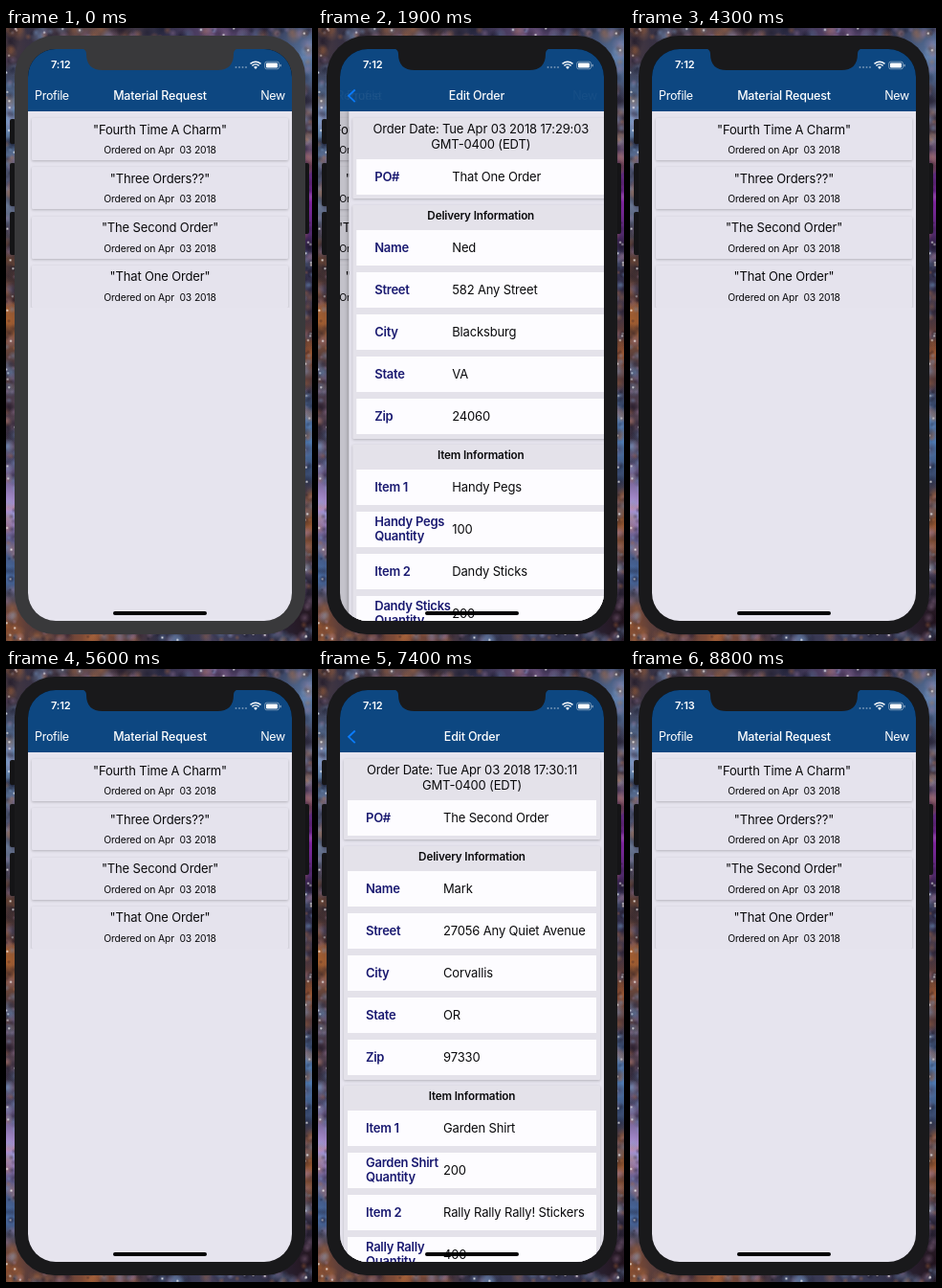
An HTML page with a canvas for the animation above (8.9 s loop, 320x640 px).

```html
<!DOCTYPE html>
<html lang="en">
<head>
<meta charset="utf-8">
<title>Material Request</title>
<style>
html, body { margin: 0; width: 100%; height: 100%; overflow: hidden; background: #1d2038; }
#stage {
  --bezel: #19191b;
  position: relative; width: 320px; height: 640px; overflow: hidden;
  font: 13px/15.6px Inter, "Open Sans", sans-serif; letter-spacing: -.012em; color: #0a0a0c;
}
#stage.idle { --bezel: #39393b; }
#stage * { position: absolute; box-sizing: border-box; }
#stage br { position: static; }
#sky { left: 0; top: 0; }
.key { background: #141416; border-radius: 2px; width: 6px; }
#body { left: 9px; top: 8px; width: 304px; height: 625px; border-radius: 42px; background: var(--bezel); }
#screen { inset: 0; clip-path: inset(22px 21px 21px 23px round 29px); background: #000; }
.page { left: 23px; top: 86px; width: 276px; height: 533px; background: #e6e4ee; }
#form { box-shadow: 0 0 5px rgba(0,0,0,.4); }
#orders { left: 0; top: 0; width: 276px; height: 206px; overflow: hidden; }
.card, .section { left: 4px; width: 268px; border-radius: 1px; box-shadow: 0 1px 3px rgba(0,0,0,.22); }
.card { background: #e5e3ed; }
.section { background: #e4e2ea; }
.mid { left: 0; right: 0; text-align: center; white-space: nowrap; transform: translateY(-50%); }
.small { font-size: 10.4px; }
.heading { font-size: 11.7px; font-weight: 600; }
.row { left: 4px; width: 260px; height: 37px; background: #fdfcff; }
.label, .value { top: 50%; transform: translateY(-50%); white-space: nowrap; }
.label { left: 19px; font-weight: 600; color: #191970; letter-spacing: -.02em; }
.value { left: 100px; }
#header { left: 23px; top: 22px; width: 276px; height: 65px; background: #0d4781; color: #fff; font-size: 12.5px; letter-spacing: -.024em; }
#header > * { top: 49px; line-height: 16px; margin-top: -8px; white-space: nowrap; }
#header > .title { left: 0; width: 276px; text-align: center; font-weight: 500; letter-spacing: -.014em; }
#header > #back { left: 7px; top: 41px; margin: 0; }
#clock { left: 47px; top: 31px; font-size: 11px; font-weight: 600; color: #fff; letter-spacing: -.01em; }
#top { left: 0; top: 0; }
#home { left: 112px; top: 609px; width: 98px; height: 4px; border-radius: 2px; background: #000; }
#cursor { left: 34px; top: 72px; }
</style>
</head>
<body>
<div id="stage">
  <canvas id="sky" width="320" height="640"></canvas>
  <div class="key" style="left:4px;top:95px;height:26px"></div>
  <div class="key" style="left:4px;top:141px;height:45px"></div>
  <div class="key" style="left:4px;top:192px;height:45px"></div>
  <div class="key" style="left:311px;top:141px;height:74px"></div>
  <div id="body"></div>
  <div id="screen">
    <div class="page" id="list"><div id="orders"></div></div>
    <div class="page" id="form"></div>
    <div id="header">
      <div id="profile" style="left:7px">Profile</div>
      <div id="new" style="right:7px">New</div>
      <div class="title" id="listTitle">Material Request</div>
      <div class="title" id="formTitle">Edit Order</div>
      <svg id="back" width="12" height="16" fill="none" stroke="#0a7cff" stroke-width="1.800"><path d="M8.700 1.500 2 7.800l6.700 6.300"/></svg>
    </div>
    <div id="clock"></div>
    <svg id="top" width="320" height="60">
      <path d="M78 21q6 1 6 6q0 17 17 17H221q17 0 17-17q0-5 6-6z" style="fill:var(--bezel)"/>
      <g fill="#fff">
        <g opacity=".4"><circle cx="240.500" cy="41" r="1"/><circle cx="244" cy="41" r="1"/><circle cx="247.500" cy="41" r="1"/><circle cx="251" cy="41" r="1"/></g>
        <path d="M261 43l-2-2.300q2-1.600 4 0z"/>
        <rect x="272" y="36.500" width="12" height="5" rx="1"/>
        <rect x="286.500" y="37.800" width="1.200" height="2.600" rx=".6" opacity=".6"/>
      </g>
      <g fill="none" stroke="#fff">
        <path d="M257.400 39.400q3.600-3 7.200 0M255.500 37.400q5.500-4.400 11 0" stroke-width="1.400"/>
        <rect x="270.700" y="35.200" width="14.800" height="7.600" rx="2" stroke-width=".7" opacity=".6"/>
      </g>
    </svg>
    <div id="home"></div>
  </div>
  <svg id="cursor" width="16" height="22"><path d="M1.500 1.500v14l3.200-3 2.200 5.200 2.600-1.100-2.200-5h4.300z" fill="#000" stroke="#fff" stroke-width="1.200"/></svg>
</div>
<script>
const $ = id => document.getElementById(id);
const LOOP = 8900, STEP = 100, SLIDE = 500, WIDTH = 276;

const orderNames = ["Fourth Time A Charm", "Three Orders??", "The Second Order", "That One Order"];
const firstOrder = {
  time: "17:29:03", po: "That One Order",
  delivery: ["Ned", "582 Any Street", "Blacksburg", "VA", "24060"],
  items: [["Item 1", "Handy Pegs"], ["Handy Pegs<br>Quantity", "100"],
          ["Item 2", "Dandy Sticks"], ["Dandy Sticks<br>Quantity", "200"]]
};
const secondOrder = {
  time: "17:30:11", po: "The Second Order",
  delivery: ["Mark", "27056 Any Quiet Avenue", "Corvallis", "OR", "97330"],
  items: [["Item 1", "Garden Shirt"], ["Garden Shirt<br>Quantity", "200"],
          ["Item 2", "Rally Rally Rally! Stickers"], ["Rally Rally<br>Quantity", "400"]]
};

// Each visit: when the form slides in, when it slides out
const visits = [
  { order: firstOrder, open: 1632, close: 3790 },
  { order: secondOrder, open: 5890, close: 7802 }
];

const mid = (y, text, cls = "") => `<div class="mid ${cls}" style="top:${y}px">${text}</div>`;
const row = (y, [label, value]) =>
  `<div class="row" style="top:${y}px"><div class="label">${label}</div><div class="value">${value}</div></div>`;
const section = (y, h, inner) => `<div class="section" style="top:${y}px;height:${h}px">${inner}</div>`;
const rows = list => list.map((r, i) => row(26 + 44.1 * i, r)).join("");

function formHtml({ time, po, delivery, items }) {
  const fields = ["Name", "Street", "City", "State", "Zip"].map((f, i) => [f, delivery[i]]);
  return section(8, 84, mid(20, `Order Date: Tue Apr 03 2018 ${time}<br>GMT-0400 (EDT)`) + row(43, ["PO#", po])) +
    section(99, 244, mid(12, "Delivery Information", "heading") + rows(fields)) +
    section(349, 300, mid(12, "Item Information", "heading") + rows(items));
}

$("orders").innerHTML = orderNames.map((name, i) =>
  `<div class="card" style="top:${8 + 51.3 * i}px;height:44px">` +
  mid(12.5, `"${name}"`) + mid(34, "Ordered on Apr&nbsp; 03 2018", "small") + "</div>").join("");

function paintSky() {
  const g = $("sky").getContext("2d");
  let seed = 11;
  const rand = () => (seed = seed * 16807 % 2147483647) / 2147483647;
  const blob = (x, y, r, color, alpha) => {
    const fade = g.createRadialGradient(x, y, 0, x, y, r);
    fade.addColorStop(0, color);
    fade.addColorStop(1, color + "00");
    g.globalAlpha = alpha;
    g.fillStyle = fade;
    g.fillRect(x - r, y - r, 2 * r, 2 * r);
  };
  g.fillStyle = "#2c2c44";
  g.fillRect(0, 0, 320, 640);
  [[0, 20, 40, "#4a3a40"], [0, 95, 60, "#6c92bc"], [0, 185, 55, "#6a7894"], [0, 240, 40, "#4a3430"],
   [0, 305, 60, "#a8602f"], [0, 400, 50, "#5a4450"], [0, 500, 60, "#b898e0"], [0, 570, 45, "#4c70a8"],
   [0, 625, 45, "#8c5030"], [320, 30, 60, "#5c7ca8"], [320, 100, 45, "#5c4a58"], [320, 180, 60, "#8424a4"],
   [320, 270, 50, "#34304c"], [320, 340, 50, "#84482c"], [320, 430, 60, "#507cb4"], [320, 520, 50, "#94542c"],
   [320, 620, 60, "#24141c"], [90, 0, 70, "#644a48"], [220, 0, 60, "#5c4670"], [90, 640, 70, "#8c5034"],
   [220, 640, 70, "#40405c"]]
    .forEach(([x, y, r, color]) => blob(x, y, r, color, 1));
  const dust = ["#0e1022", "#c07440", "#7ca0d0", "#181020", "#a884a8"];
  for (let i = 0; i < 600; i++) {
    const alongSide = rand() < .7;
    const x = alongSide ? (rand() < .5 ? rand() * 10 : 310 + rand() * 10) : rand() * 320;
    const y = alongSide ? rand() * 640 : (rand() < .5 ? rand() * 10 : 630 + rand() * 10);
    blob(x, y, 2 + rand() * 7, dust[i % 5], .35);
    if (i % 8 === 0) blob(x, y, 1.8, "#ffffff", .8);
  }
}

// cubic-bezier(.2833, .99, .31833, .99)
function ease(x) {
  if (x <= 0 || x >= 1) return x <= 0 ? 0 : 1;
  const curve = (s, a, b) => 3 * (1 - s) ** 2 * s * a + 3 * (1 - s) * s * s * b + s ** 3;
  let lo = 0, hi = 1;
  for (let i = 0; i < 24; i++) {
    const s = (lo + hi) / 2;
    if (curve(s, .2833, .31833) < x) lo = s; else hi = s;
  }
  return curve(lo, .99, .99);
}

function slide(el, x, opacity) {
  el.style.transform = `translateX(${x}px)`;
  el.style.opacity = opacity;
}

let shown;
function draw(t) {
  const visit = visits[t < 5000 ? 0 : 1];
  const p = ease((t - visit.open) / SLIDE) - ease((t - visit.close) / SLIDE);
  if (shown !== visit) {
    shown = visit;
    $("form").innerHTML = formHtml(visit.order);
  }
  slide($("list"), -.3 * WIDTH * p, 1 - .15 * p);
  slide($("form"), WIDTH * (1 - p), p > 0 ? 1 : 0);
  slide($("listTitle"), -148 * p, 1 - p);
  slide($("formTitle"), 148 * (1 - p), p);
  $("profile").style.opacity = $("new").style.opacity = 1 - p;
  const pressed = t >= visit.close - 150;
  $("back").style.opacity = pressed ? .1 * p : p;
  $("cursor").style.display = t >= 3600 && t < 3900 ? "" : "none";
  $("stage").classList.toggle("idle", t < 1000);
  $("clock").textContent = t < 8400 ? "7:12" : "7:13";
}

const start = performance.now();
function tick() {
  const t = (performance.now() - start) % LOOP;
  draw(Math.floor(t / STEP) * STEP);
  requestAnimationFrame(tick);
}
paintSky();
tick();
</script>
</body>
</html>
```
